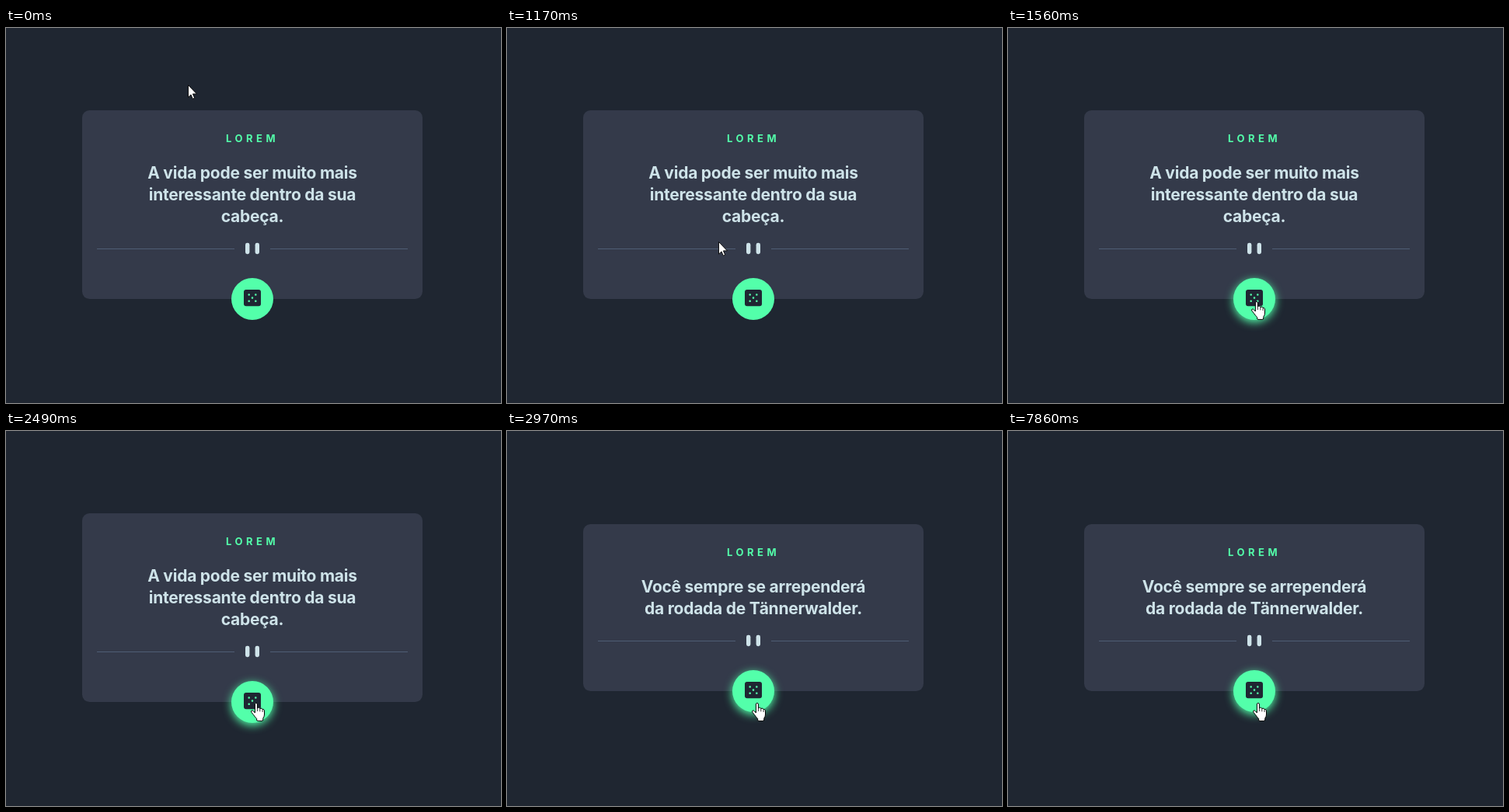
An HTML page that plays this animation: 637 px wide and 483 px high, repeating every 8 s.

```html
<!DOCTYPE html>
<html lang="pt">
<head>
<meta charset="utf-8">
<title>Frases</title>
<style>
  html, body { margin: 0; height: 100%; overflow: hidden; background: #1f2631; }
  svg { display: block; width: 637px; height: 483px; }
  text { font-family: Inter, "Open Sans", sans-serif; font-weight: 700; }
  #title { font-size: 13px; letter-spacing: 4.5px; fill: #53ffaa; }
  .quote { font-size: 21px; letter-spacing: -.25px; fill: #cee3e9; text-anchor: middle; }
  .hover { filter: drop-shadow(0 3px 6px #53ffaa); }
  #cursor path { fill: #fff; stroke: #000; stroke-linejoin: round; }
</style>
</head>
<body>
<svg viewBox="0 0 637 483">
  <rect id="card" x="98" width="438" rx="9.5" fill="#343a4a"/>
  <g id="top">
    <text id="title" x="283" y="147">LOREM</text>
    <g class="quote" id="first">
      <text x="317" y="194">A vida pode ser muito mais</text>
      <text x="317" y="222">interessante dentro da sua</text>
      <text x="317" y="250">cabeça.</text>
    </g>
    <g class="quote" id="second">
      <text x="317" y="194">Você sempre se arrependerá</text>
      <text x="317" y="222">da rodada de Tännerwalder.</text>
    </g>
  </g>
  <g id="bottom">
    <path d="M117 284.5H294M340 284.5H517" stroke="#4f5d74"/>
    <g fill="#cee3e9">
      <rect x="308" y="276.8" width="5.4" height="14.4" rx="2.4"/>
      <rect x="320.6" y="276.8" width="5.4" height="14.4" rx="2.4"/>
    </g>
    <circle id="button" cx="317" cy="349" r="27" fill="#53ffaa"/>
    <rect x="306" y="337" width="22" height="21.3" rx="3" fill="#1f2632"/>
    <path d="M312.7 343.5h0M321.3 343.5h0M317 347.6h0M312.7 351.7h0M321.3 351.7h0"
      stroke="#53ffaa" stroke-width="2.6" stroke-linecap="round"/>
  </g>
  <g id="cursor">
    <path id="arrow" stroke-width=".9" d="M.5 .5V16.2L4 12.9 6.3 18.2 8.7 17.2 6.4 11.9H11.4Z"/>
    <g id="hand">
      <path d="M-.6 1.9Q-.6 .5 .9 .5T2.4 1.9V7Q3.2 6 4.6 6.3 5.6 6.6 5.8 7.6 7 6.8 8.2 7.4 9 7.8 9.1 8.6 10.3 8 11 9 11.5 9.6 11.5 11V15Q11.5 18 9.8 20V22Q9.5 23.4 8 23.4H3Q1.6 23.4 1.6 22V20.5Q-.5 18.5 -2.6 15.4L-5 12.4Q-6 10.8 -4.8 10.1 -3.6 9.6 -2.4 11L-.6 13Z"/>
      <path d="M2.4 7V11M5.8 7.6V11.4M9.1 8.6V12" stroke-width=".8"/>
    </g>
  </g>
  <circle id="click" cx="321" r="12" fill="#ffeb00" fill-opacity=".52"/>
</svg>
<script>
const LOOP = 8000, STEP = 65;
const $ = id => document.getElementById(id);
const show = (id, on) => $(id).style.display = on ? "" : "none";
const set = (id, name, value) => $(id).setAttribute(name, value);
const smooth = p => p * p * (3 - 2 * p);
const easeOut = p => 1 - (1 - p) ** 2;
const mix = (a, b, p) => a.map((v, i) => Math.round(v + (b[i] - v) * p));

// The pointer is sampled in steps, as in a screen recording.
function pointer(t) {
  const start = [234, 73], middle = [272, 275], end = [319, 352];
  if (t < 910) return start;
  if (t >= 2490) return [321, 350];
  if (t >= 1700) return [321, 351];
  if (t >= 1650) return [320, 352];
  const s = Math.min(1560, 910 + Math.floor((t - 910) / STEP) * STEP);
  return s < 1170
    ? mix(start, middle, smooth((s - 845) / 325))
    : mix(middle, end, easeOut((s - 1170) / 390));
}

function draw(t) {
  const swapped = t >= 2830, shift = swapped ? 14 : 0;
  const [x, y] = pointer(t);
  const over = Math.hypot(x - 317, y - 349 + shift) < 27;

  set("card", "y", 106 + shift);
  set("card", "height", 243 - 2 * shift);
  set("top", "transform", `translate(0 ${shift})`);
  set("bottom", "transform", `translate(0 ${-shift})`);
  show("first", !swapped);
  show("second", swapped);

  set("button", "class", over ? "hover" : "");
  show("arrow", !over);
  show("hand", over);
  set("cursor", "transform", `translate(${x} ${y})`);
  show("click", (t >= 2100 && t < 2160) || (t >= 7810 && t < 7860));
  set("click", "cy", y);
}

let origin;
function frame(now) {
  origin ??= now;
  draw((now - origin) % LOOP);
  requestAnimationFrame(frame);
}
draw(0);
requestAnimationFrame(frame);
</script>
</body>
</html>
```
